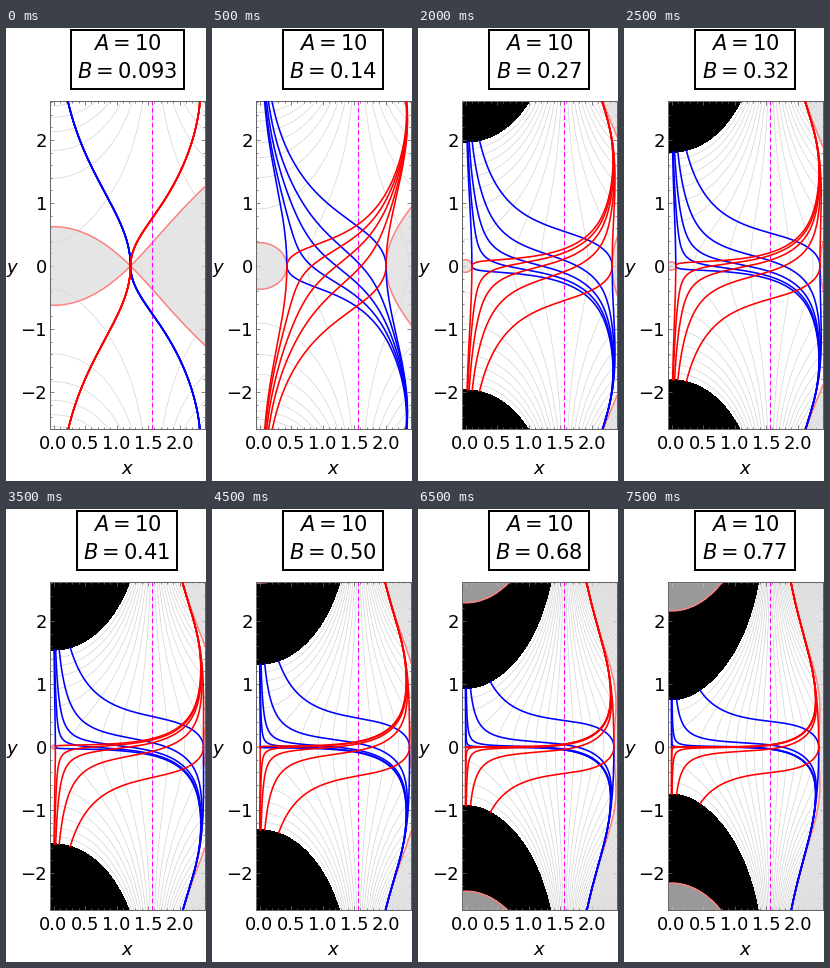
These frames come from a looping animation (200 by 453 pixels, 8 s). A matplotlib script:

```python
import numpy as np
import matplotlib.pyplot as plt
from matplotlib.animation import ArtistAnimation
from matplotlib.ticker import MultipleLocator

W, H, DPI = 200, 453, 100
PX = 72 / DPI                       # points per pixel
A, B_CRIT, FRAMES, SEEDS = 10, 0.09345, 16, 5
LEFT, RIGHT, TOP, BOTTOM = 44.4, 199.4, 73.4, 401.4
X0, Y0, UNIT = 47.5, 238, 63        # plot origin and scale in pixels
MID = 121                           # centre of the title box

plt.rcParams["font.family"] = "DejaVu Sans"
plt.rcParams["mathtext.fontset"] = "dejavusans"


def height(z, b):
    return 1 - b * np.cos(z).real


def mach(z, b):
    return A * b * np.abs(np.sin(z)) / (height(z, b) ** 4 + 1e-12) + 1e-9


def bisect(f, lo, hi):
    """Root of f with f(lo) < 0 < f(hi)."""
    for _ in range(50):
        mid = (lo + hi) / 2
        lo, hi = (mid, hi) if f(mid) < 0 else (lo, mid)
    return (lo + hi) / 2


def sonic_points(b):
    peak = np.arccos((np.sqrt(1 + 48 * b * b) - 1) / (6 * b))
    f = lambda x: mach(x + 0j, b) - 1
    if f(peak) <= 0:
        return peak, peak
    return bisect(f, 0, peak), bisect(f, np.pi, peak)


def heading(z, b):
    """Unit tangent of the falling characteristic."""
    s = np.conj(np.sin(z))
    inv = np.minimum(1 / mach(z, b), 1)
    return s / (np.abs(s) + 1e-12) * (np.sqrt(1 - inv ** 2) - 1j * inv)


def trace(z, b, step, count=1100):
    path = [z]
    for _ in range(count):
        k1 = heading(z, b)
        k2 = heading(z + step / 2 * k1, b)
        k3 = heading(z + step / 2 * k2, b)
        k4 = heading(z + step * k3, b)
        z = z + step / 6 * (k1 + 2 * k2 + 2 * k3 + k4)
        z = np.clip(z.real, -1, 4) + 1j * np.clip(z.imag, -4, 4)
        path.append(z)
    return np.array(path)


fig = plt.figure(figsize=(W / DPI, H / DPI), dpi=DPI, facecolor="white")
ax = fig.add_axes([LEFT / W, 1 - BOTTOM / H, (RIGHT - LEFT) / W, (BOTTOM - TOP) / H])
ax.set_xlim((LEFT - X0) / UNIT, (RIGHT - X0) / UNIT)
ax.set_ylim((Y0 - BOTTOM) / UNIT, (Y0 - TOP) / UNIT)
for axis, major, minor in ((ax.xaxis, 0.5, 0.1), (ax.yaxis, 1, 0.2)):
    axis.set_major_locator(MultipleLocator(major))
    axis.set_minor_locator(MultipleLocator(minor))
ax.yaxis.set_major_formatter(lambda v, _: f"{v:.0f}".replace("-", "\u2212"))
ax.tick_params(which="both", direction="in", top=True, right=True,
               color="0.4", width=0.8 * PX)
ax.tick_params(which="major", length=4 * PX, labelsize=18 * PX)
ax.tick_params(which="minor", length=2.5 * PX)
ax.tick_params(axis="x", pad=5.5 * PX)
ax.tick_params(axis="y", pad=3.5 * PX)
for spine in ax.spines.values():
    spine.set(color="0.4", linewidth=PX)
ax.axvline(np.pi / 2, color="magenta", lw=1.1 * PX, dashes=(4, 2.7), zorder=3)


def label(x, y, text, size=18, **kw):
    return fig.text(x / W, 1 - y / H, text, fontsize=size * PX,
                    ha="center", va="center", **kw)


label(121, 441.5, "x", style="italic")
label(6, 240, "y", style="italic")

gx, gy = np.meshgrid(np.linspace(*ax.get_xlim(), 320), np.linspace(*ax.get_ylim(), 660))
grid = gx + 1j * gy

bs = B_CRIT + (1 - B_CRIT) * np.arange(FRAMES) / 20
seeds = np.array([np.linspace(*sonic_points(b), SEEDS) for b in bs]) + 0j
col = bs[:, None]
paths = np.concatenate([trace(seeds, col, -0.005)[::-1], trace(seeds, col, 0.005)[1:]])
paths[height(paths, col) < 0] = np.nan


def title(b):
    width = 113 if b < 0.1 else 100
    box = plt.Rectangle(((MID - width / 2) / W, 1 - 60.8 / H), width / W, 59 / H,
                        transform=fig.transFigure, fc="white", ec="black", lw=2 * PX)
    fig.add_artist(box)
    return [box, label(MID, 16, "$A = 10$", 21), label(MID, 44, f"$B = {b:#.2g}$", 21)]


def draw(i):
    b = bs[i]
    h = height(grid, b)
    sonic = np.log(mach(grid, b))
    art = [
        ax.contour(gx, gy, h, levels=np.arange(0.1, 5, 0.1), colors="0.83",
                   linewidths=0.7 * PX, zorder=1),
        ax.contourf(gx, gy, h, levels=[-99, 0], colors="black", zorder=1.5),
        ax.contourf(gx, gy, sonic, levels=[-99, 0], colors=["0.857"], alpha=0.7, zorder=2),
        ax.contour(gx, gy, sonic, levels=[0], colors=[(1, 0.5, 0.5)],
                   linewidths=1.5 * PX, zorder=2.5),
    ]
    for j in range(SEEDS):
        z = paths[:, i, j]
        for sign, color in ((1, "blue"), (-1, "red")):
            art += ax.plot(z.real, sign * z.imag, color=color, lw=1.6 * PX,
                           zorder=4 if sign > 0 else 4.5)
    return art + title(b)


anim = ArtistAnimation(fig, [draw(i) for i in range(FRAMES)], interval=500,
                       repeat=True, repeat_delay=0)
plt.show()
```
